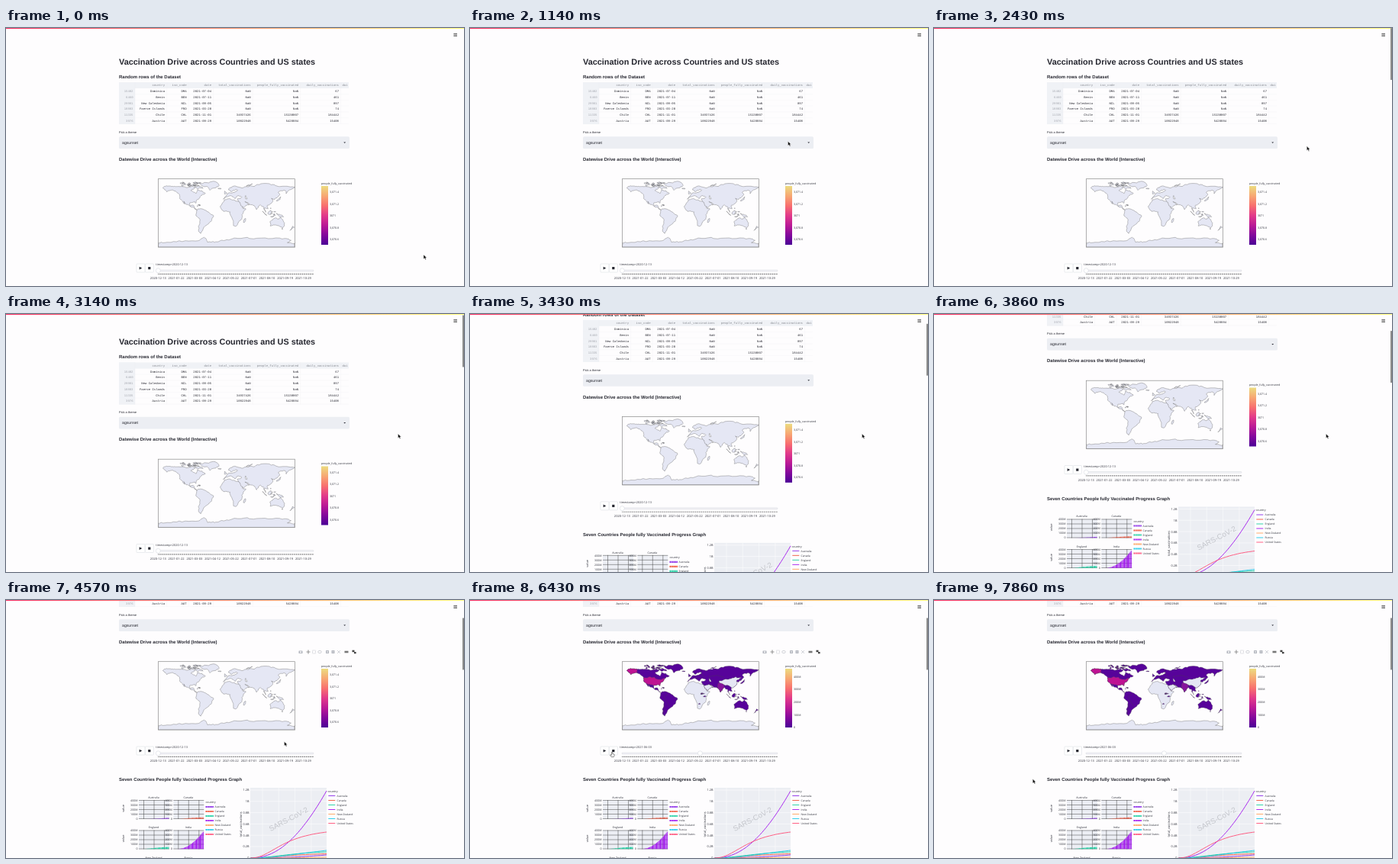
Write an HTML page that moves like this. It is 600 px wide and 338 px high and loops after 8000 ms.

```html
<!DOCTYPE html>
<html lang="en">
<head>
<meta charset="utf-8">
<title>Vaccination dashboard</title>
<style>
  html, body { margin: 0; width: 100%; height: 100%; overflow: hidden; background: #fefdfe; }
  svg { display: block; width: 100%; height: 100%; }
  text { font-family: "Liberation Sans", Arial, sans-serif; fill: #262730; white-space: pre; text-rendering: geometricPrecision; }
  .mono { font-family: "Liberation Mono", monospace; }
  .plot { font-family: "Open Sans", sans-serif; fill: #30323c; }
  .bold { font-weight: 700; }
  .pale { fill: #a3a6ae; }
  .head { fill: #85888f; }
</style>
</head>
<body>
<svg id="stage" viewBox="0 0 600 338"></svg>
<script>
const STEP = 1000 / 7, STEPS = 56;
const SLIDER_X = 199.3, DAY_WIDTH = 0.594;

const rect = (x, y, w, h, fill, extra = '') =>
  `<rect x="${x}" y="${y}" width="${w}" height="${h}" fill="${fill}" ${extra}/>`;
const path = (d, stroke, width = 0.5, extra = '') =>
  `<path d="${d}" fill="none" stroke="${stroke}" stroke-width="${width}" ${extra}/>`;
// y is the middle of the capitals
const text = (x, y, str, size, cls = '', extra = '') =>
  `<text x="${x}" y="${y + size * 0.36}" font-size="${size}" class="${cls}" ${extra}>${str}</text>`;
const tilted = (x, y, angle, str, size, cls, extra = '') =>
  text(0, 0, str, size, cls, `text-anchor="middle" transform="translate(${x} ${y}) rotate(${angle})" ${extra}`);
const END = 'text-anchor="end"', MID = 'text-anchor="middle"';
const range = n => [...Array(n).keys()];
const lerp = (a, b, u) => a + (b - a) * u;
const dateAt = day => new Date(Date.UTC(2020, 11, 13 + day)).toISOString().slice(0, 10);

// ---- table -----------------------------------------------------------------
const columns = [166.5, 208, 236.5, 269, 320.7, 383.2, 436];
const heads = ['', 'country', 'iso_code', 'date', 'total_vaccinations', 'people_fully_vaccinated', 'daily_vaccinations'];
const rows = [
  '15402|Dominica|DMA|2021-07-04|NaN|NaN|67',
  '6460|Benin|BEN|2021-07-11|NaN|NaN|461',
  '29981|New Caledonia|NCL|2021-09-05|NaN|NaN|897',
  '18803|Faeroe Islands|FRO|2021-03-20|NaN|NaN|74',
  '11335|Chile|CHL|2021-11-01|34937426|15130807|184442',
  '3976|Austria|AUT|2021-09-29|10922948|5428884|15408',
];

function table() {
  const line = (cells, y, cls) => cells.map((cell, i) =>
    text(columns[i], y, cell, 3.95, 'mono ' + (i ? cls : 'pale'), END)).join('');
  return rect(148, 71, 301, 8, '#f0f2f6') + rect(148, 71, 21, 55, '#f0f2f6')
    + line(heads, 75, 'head') + text(440.5, 75, 'dai', 3.95, 'mono head')
    + rows.map((row, r) => line(row.split('|'), 82.8 + r * 7.75, '') + path(`M148 ${86.7 + r * 7.75}H449`, '#eceef2', 0.3)).join('')
    + path(columns.map(x => `M${x + 2.6} 71V126`).join(''), '#eceef2', 0.3);
}

// ---- world map: a few key points (lon,lat), coasts roughened by noise ----------
const noise = (a, b) => {
  const n = Math.sin(a * 12.9898 + b * 78.233) * 43758.5453;
  return n - Math.floor(n) - 0.5;
};
const clamp = (v, limit) => Math.max(-limit, Math.min(limit, v));

// The displacement depends on the midpoint only, so shared borders stay shared.
function rough(points) {
  return points.flatMap((p, i) => {
    const q = points[(i + 1) % points.length];
    const mx = (p[0] + q[0]) / 2, my = (p[1] + q[1]) / 2;
    const amount = Math.min(Math.hypot(p[0] - q[0], p[1] - q[1]), 13) * 0.35;
    return [p, [mx + noise(mx, my) * amount, my + noise(my, mx + 7) * amount]];
  });
}
const project = ([lon, lat]) =>
  `${(289 + clamp(lon, 180) * 0.497).toFixed(1)} ${(242.4 - clamp(lat, 90) * 0.497).toFixed(1)}`;
const points = str => str.split(' ').map(p => p.split(',').map(Number));
const shape = str => `M${rough(rough(rough(points(str)))).map(project).join('L')}Z`;

function scatter(count, lon, lat, spreadLon, spreadLat, size) {
  return range(count).map(i => {
    const x = lon + noise(i, lon) * spreadLon, y = lat + noise(lat, i) * spreadLat;
    return range(4).map(k => {
      const r = size * (0.8 + noise(i, k + lon)), a = k * Math.PI / 2;
      return [x + r * Math.cos(a), y + r * 0.5 * Math.sin(a)].join();
    }).join(' ');
  });
}

const alaska = '-141,60 -158,56 -168,66 -156,71 -141,70';
const southernStates = '-67,46 -76,36 -81,26 -84,30 -97,27';
const reporting = [
  `${alaska} -128,70 -95,69 -82,68 -94,59 -80,52 -77,62 -65,59 -56,52 ${southernStates} -96,18 -88,21 -83,10 -78,8 -94,16 -107,23 -113,31 -110,24 -117,32 -124,40 -124,48`,
  '-9,37 -2,44 8,54 22,55 29,60 18,60 12,56 5,61 24,71 40,66 70,70 104,78 130,72 180,68 163,59 157,51 155,59 136,54 140,48 127,36 118,39 122,31 108,21 109,11 100,13 103,2 97,17 89,22 79,9 72,20 57,26 48,30 60,22 45,13 35,28 28,37 40,42 30,46 22,38 13,45 3,43',
  '-78,8 -62,10 -35,-6 -40,-21 -58,-36 -68,-54 -74,-48 -70,-18 -81,-5',
  '-72,78 -30,83 -20,72 -44,60 -54,70',
  '-88,73 -70,70 -62,65 -78,65',
  '114,-23 130,-12 137,-16 142,-11 153,-27 147,-39 131,-32 115,-34',
  '131,-1 147,-6 150,-10 138,-8', '109,1 117,7 116,-4 110,-3', '95,5 106,-6 102,-4',
  '131,32 141,36 143,43 137,37', '173,-35 178,-38 167,-46', '-5,50 1,52 -5,58', '-23,65 -14,65 -18,63',
  '52,71 68,77 56,74', '145,-41 148,-41 147,-43',
  ...scatter(16, -97, 75, 46, 11, 5), ...scatter(9, 122, 2, 12, 26, 2.2), ...scatter(4, -75, 20, 14, 4, 2),
];
const silent = [
  '-6,35 10,37 32,31 43,12 51,11 40,-5 40,-16 26,-34 18,-33 9,3 -8,4 -17,15',
  '44,-24 47,-25 50,-14',
  '-180,-79 -140,-75 -75,-73 -60,-64 -50,-77 -25,-76 0,-70 60,-67 140,-66 170,-72 160,-78 180,-79 180,-93 -180,-93',
];
const unitedStates = [alaska, `-124,48 -95,49 -82,43 ${southernStates} -117,32 -124,40`];
const noData = ['75,39 97,43 119,50 134,48 121,40 122,31 108,21 97,28 80,31', '35,28 48,30 60,22 45,13'];
const indiaEtc = ['72,20 74,34 89,27 89,22 79,9'];
const africanData = scatter(5, 27, -8, 24, 34, 3.5);
const borders = ['-60,5 -70,-4 -56,-27', '-68,-22 -72,-50', '47,50 70,54 87,49', '8,54 15,47 28,48', '28,69 28,57 39,48'];

const NEUTRAL = '#e5e7f4', COVERED = '#57039a';
const land = (id, list, fill) =>
  `<path id="${id}" d="${list.map(shape).join('')}" fill="${fill}" stroke="#555" stroke-width=".35" stroke-linejoin="round"/>`;

function map() {
  return land('silent', silent, NEUTRAL) + land('reporting', reporting, NEUTRAL)
    + '<g id="detail">' + land('', noData, NEUTRAL) + land('', africanData, COVERED)
    + land('us', unitedStates, COVERED) + land('', indiaEtc, '#86149c')
    + path(borders.map(b => 'M' + points(b).map(project).join('L')).join(''), '#444', 0.3) + '</g>'
    + land('', ['50,37 54,37 50,46'], '#fff')
    + rect(199.5, 197.7, 179, 89.3, 'none', 'stroke="#8c8c8c" stroke-width=".7"');
}

function colorScale() {
  const labels = (id, list, y, gap) =>
    `<g id="${id}">${list.map((s, i) => text(424, y + i * gap, s, 3.6, 'plot')).join('')}</g>`;
  return rect(413, 207, 9, 77, 'url(#sunset)')
    + text(413, 203.5, 'people_fully_vaccinated', 3.65, 'plot')
    + labels('scaleBefore', ['3,071.4', '3,071.2', '3071', '3,070.8', '3,070.6'], 215, 15.5)
    + labels('scaleAfter', ['400M', '300M', '200M', '100M', '0'], 217.3, 16.7);
}

function modeBar() {
  const gray = '#b4b7bf', y = 185;
  const box = x => rect(x - 2, y - 2, 4, 4, gray, 'rx=".5"');
  return '<g id="modeBar">' + rect(383.5, y - 1.5, 5, 3.5, gray, 'rx=".6"') + `<circle cx="386" cy="${y + 0.3}" r="1" fill="#fff"/>`
    + path(`M393.5 ${y}h5M396 ${y - 2.5}v5`, '#999', 1.2)
    + rect(401.5, y - 2, 4, 4, 'none', `stroke="${gray}" stroke-width=".6" stroke-dasharray="1 .6"`)
    + `<ellipse cx="411" cy="${y}" rx="2.3" ry="1.6" fill="none" stroke="${gray}" stroke-width=".6"/>`
    + box(421) + box(428.5) + path(`M420 ${y}h2M421 ${y - 1}v2M427.5 ${y}h2`, '#fff', 0.6)
    + path(`M434 ${y - 2}l4 4m0-4l-4 4`, gray, 0.6)
    + rect(443.5, y - 1.3, 5, 2.6, '#777') + rect(453.5, y - 2.3, 3, 2.5, '#444') + rect(456, y, 2.6, 2.3, '#444') + '</g>';
}

function controls() {
  const button = x => rect(x, 309, 11, 11, '#fff', 'rx=".8" stroke="#d5d8df" stroke-width=".5"');
  return button(171) + button(182.4)
    + '<path d="M174.6 312.7l3.7 1.9-3.7 1.9z" fill="#262730"/>' + rect(186.2, 313, 3.2, 3.2, '#262730')
    + '<text id="stamp" x="196.3" y="311.3" font-size="3.85" class="plot"></text>'
    + rect(199, 317, 204, 1.8, '#f4f5f8', 'rx=".9" stroke="#c9ccd4" stroke-width=".4"')
    + path('M199.3 322.4H403', '#555', 1.2, 'stroke-dasharray=".8 .8"')
    + range(9).map(i => text(SLIDER_X + i * 40 * DAY_WIDTH, 327.9, dateAt(i * 40), 4, 'plot', MID)).join('')
    + '<circle id="knob" cy="317.8" r="3" fill="#fff" stroke="#cfd2da" stroke-width=".5"/>';
}

// ---- country charts: saturation is how early the growth levels off ---------------
const countries = [
  { name: 'Australia', color: '#8a2be8', bar: 1.3, total: 4, saturation: 9 },
  { name: 'Canada', color: '#f0553b', bar: 1.9, total: 5.5, saturation: 0.3 },
  { name: 'England', color: '#19cfa0', bar: 2.6, total: 8, saturation: 0.3 },
  { name: 'India', color: '#a216ee', bar: 22.5, total: 88, saturation: 9 },
  { name: 'New Zealand', color: '#ffa15a', bar: 0.4, total: 1, saturation: 9 },
  { name: 'Russia', color: '#19c9e8', bar: 3.2, total: 10, saturation: 1 },
  { name: 'United States', color: '#ff4f78', bar: 12, total: 34, saturation: 0.2 },
];
const growth = (u, k) => u ** 2.2 * (1 + k) / (u ** 2.2 + k);

const legend = (x, y, swatch) => text(x, y, 'country', 3.7, 'plot')
  + countries.map(({ name, color }, i) => swatch(x, y + 6 + i * 6, color) + text(x + 12, y + 6 + i * 6, name, 3.45, 'plot')).join('');

function smallChart({ name, color, bar, saturation }, i) {
  const x = 174 + (i % 2) * 45.3, y = 379 + Math.floor(i / 2) * 39.5;
  const levels = range(5).map(n => y + 0.5 + n * 6);
  const bars = range(29).map(n => `M${x + 4 + n * 1.25} ${y + 24.7}v${-bar * growth(n / 28, saturation)}`).join('');
  return rect(x, y, 40, 25, '#eceef4') + text(x + 19.5, y - 3.6, name, 3.6, 'plot', MID)
    + path(levels.map(l => `M${x} ${l}h40`).join('') + range(3).map(n => `M${x + 6.5 + n * 13.5} ${y}v25`).join(''), '#333', 0.45)
    + path(bars, color, 1)
    + levels.map((l, n) => text(x - 1.5, l, n < 4 ? 400 - n * 100 + 'M' : '0', 3.6, 'plot', END)).join('')
    + (i % 2 ? '' : tilted(153.5, y + 11, -90, 'value', 3.9, 'plot'));
}

function totalChart() {
  const levels = ['1.2B', '1B', '0.8B', '0.6B', '0.4B', '0.2B', '0'];
  const curve = c => 'M' + range(41).map(n =>
    `${320 + n * 2.5} ${(455 - c.total * growth(n / 40, c.saturation)).toFixed(1)}`).join('L');
  return rect(320, 363, 100, 92, '#eceef3')
    + path(range(7).map(n => `M320 ${366 + n * 14.8}h100`).join('') + range(4).map(n => `M${336 + n * 21.3} 363v92`).join(''), '#fff', 0.5)
    + levels.map((s, n) => text(318.5, 366 + n * 14.8, s, 3.9, 'plot', END)).join('')
    + tilted(370, 404, -28, 'SARS-CoV-2', 9.7, '', 'style="fill:#c3c5cb"')
    + tilted(307.5, 411, -90, 'total_vaccinations', 4, 'plot')
    + countries.map(c => path(curve(c), c.color, 0.9)).join('');
}

// ---- scene -----------------------------------------------------------------
const gradient = (id, colors, dir) => `<linearGradient id="${id}" x1="0" y1="0" ${dir}>`
  + colors.map((c, i) => `<stop offset="${i / (colors.length - 1)}" stop-color="${c}"/>`).join('') + '</linearGradient>';
const sunset = ['#ecdc80', '#f7a873', '#f8706f', '#e23a8a', '#bb1a96', '#83089c', '#4b0296'];

const $ = id => document.getElementById(id);
$('stage').innerHTML = `<defs>${gradient('sunset', sunset, 'x2="0" y2="1"')}${gradient('topLine', ['#f63366', '#fffd80'], 'x2="1" y2="0"')}</defs>`
  + '<g id="page">'
  + text(148, 44, 'Vaccination Drive across Countries and US states', 10.87, 'bold')
  + text(148, 63.6, 'Random rows of the Dataset', 6, 'bold') + table()
  + text(148, 136.5, 'Pick a theme', 3.98)
  + rect(148, 142.3, 302, 15.7, '#eceef3', 'rx="1.6"') + text(152, 150, 'agsunset', 5.2)
  + '<path d="M442.3 149.5h2.8l-1.4 1.5z" fill="#262730"/>'
  + text(148, 171.8, 'Datewise Drive across the World (Interactive)', 6, 'bold')
  + map() + colorScale() + modeBar() + controls()
  + text(148, 352, 'Seven Countries People fully Vaccinated Progress Graph', 5.95, 'bold')
  + countries.slice(0, 6).map(smallChart).join('')
  + legend(261.5, 382, (x, y, c) => path(`M${x} ${y}h10.5`, c, 2.2, 'stroke-dasharray="1.4 .4"'))
  + totalChart() + legend(421.5, 367.5, (x, y, c) => path(`M${x + 0.8} ${y}h9`, c, 0.9)) + '</g>'
  + rect(0, 0, 600, 1.1, 'url(#topLine)')
  + path('M586.4 7.4h4.6M586.4 9h4.6M586.4 10.6h4.6', '#444', 0.8)
  + rect(598, 0, 2, 68, '#8b8b8b', 'id="scrollbar" rx=".6"')
  + '<path id="arrow" d="M0 0V5.6L1.4 4.5L2.4 6.6L3.4 6.1L2.5 4.1H4.2Z" fill="#111" stroke="#fff" stroke-width=".4"/>'
  + '<path id="hand" d="M-.6 .4Q0-.5.6.4V2.4L3 3V5Q2.6 6 2.3 6.6H-.8L-2.5 4L-1.8 3.5L-.6 4.4Z" fill="#fff" stroke="#222" stroke-width=".5"/>';

// ---- motion: each move is [first step, last step, ...destination] -----------------
const cursorMoves = [[3, 8, 416.5, 148.5], [15, 18, 513.5, 157], [29, 32, 364.5, 185.5],
  [32, 36, 176, 197], [42, 45, 186, 199], [52, 55, 129.3, 234.5]];
const scrollMoves = [[21, 22, 7.5], [22, 25, 91], [25, 29, 117]];
const dayMoves = [[38, 40, 60], [41, 45, 172]];
const smooth = u => u * u * (3 - 2 * u), easeOut = u => 1 - (1 - u) ** 2, linear = u => u;

const follow = (start, moves, step, ease) => moves.reduce((at, [from, to, ...goal]) => {
  const u = ease(Math.max(0, Math.min(1, (step - from) / (to - from))));
  return at.map((v, i) => lerp(v, goal[i], u));
}, start);

const show = (id, on) => $(id).setAttribute('display', on ? 'inline' : 'none');
const mix = (a, b, u) => `rgb(${a.map((v, i) => Math.round(lerp(v, b[i], u)))})`;

function draw(step) {
  const [x, y] = follow([547, 297], cursorMoves, step, smooth);
  const [scroll] = follow([0], scrollMoves, step, step > 25 ? easeOut : linear);
  const day = Math.round(follow([0], dayMoves, step, linear)[0]);
  const loaded = step >= 42, overButton = step >= 35 && step < 53;

  $('page').setAttribute('transform', `translate(0 ${-scroll})`);
  $('scrollbar').setAttribute('y', scroll * 0.2);
  show('scrollbar', step >= 13);
  show('modeBar', step >= 31);

  $('stamp').textContent = 'timestamp=' + dateAt(day);
  $('knob').setAttribute('cx', SLIDER_X + day * DAY_WIDTH);
  $('reporting').setAttribute('fill', loaded ? COVERED : NEUTRAL);
  $('us').setAttribute('fill', mix([87, 3, 154], [190, 18, 146], day / 172));
  show('detail', loaded);
  show('scaleBefore', !loaded);
  show('scaleAfter', loaded);

  for (const id of ['arrow', 'hand']) $(id).setAttribute('transform', `translate(${x} ${y})`);
  show('arrow', !overButton);
  show('hand', overButton);
}

// The picture advances seven times a second.
function tick() {
  draw(Math.floor((performance.now() + 6) / STEP) % STEPS);
  requestAnimationFrame(tick);
}
tick();
</script>
</body>
</html>
```
